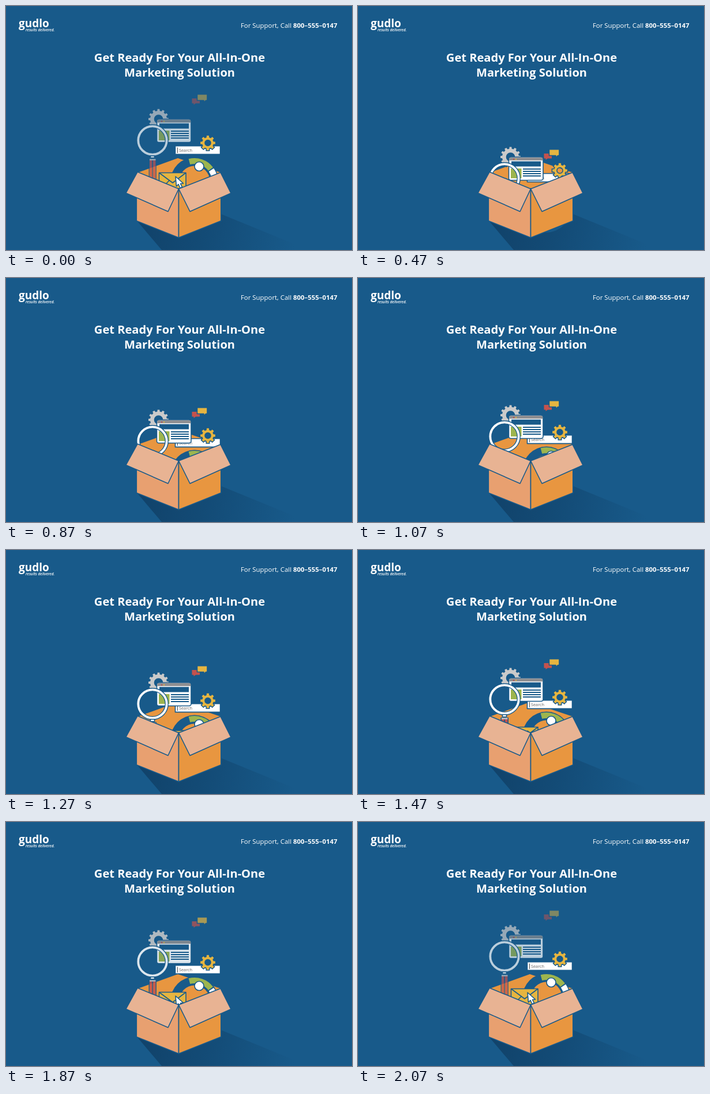
Animation, 600 px wide and 425 px high, one loop 3.07 s. Source, as an HTML page:

```html
<!DOCTYPE html>
<html lang="en">
<head>
<meta charset="utf-8">
<title>All-In-One Marketing Solution</title>
<style>
  html, body { margin: 0; width: 100%; height: 100%; overflow: hidden; background: #185a8a; }
  svg { display: block; width: 600px; height: 425px; --bg: #185a8a; font-family: "Open Sans", sans-serif; }
  .edge { stroke: var(--bg); stroke-width: 1.6; stroke-linejoin: round; }
  .gear { stroke: var(--bg); stroke-width: 3; paint-order: stroke; fill-rule: evenodd; }
  .line { stroke: var(--bg); fill: none; }
  .bg { fill: var(--bg); }
  .white { fill: #fff; }
  .yellow { fill: #e6b540; }
  .orange { fill: #e89640; }
  .green { stroke: #9db54e; }
  .red { fill: #c4524d; }
  .flap { fill: #e8b393; }
</style>
</head>
<body>
<svg viewBox="0 0 600 425">
  <defs>
    <linearGradient id="shade" gradientUnits="userSpaceOnUse" x1="240" y1="375" x2="500" y2="425">
      <stop offset="0" stop-color="#11436b"/>
      <stop offset=".4" stop-color="#134b76"/>
      <stop offset="1" stop-color="#185a8a"/>
    </linearGradient>
  </defs>
  <rect class="bg" width="600" height="425"/>

  <g class="white">
    <text x="22" y="36.5" font-size="19" font-weight="700">gudlo</text>
    <text x="34" y="44" font-size="6.5" font-weight="600" font-style="italic">results delivered.</text>
    <text x="574.5" y="38" font-size="11.4" text-anchor="end">For Support, Call <tspan font-weight="700">800–555–0147</tspan></text>
    <g font-size="20.1" font-weight="700" text-anchor="middle">
      <text x="301" y="97">Get Ready For Your All-In-One</text>
      <text x="301" y="123">Marketing Solution</text>
    </g>
  </g>

  <path fill="url(#shade)" d="M227 374L270 425H525L372 362Z"/>
  <path class="orange" d="M229 290L298 265L372 290L299 320Z"/>

  <!-- Items are drawn where they come to rest. -->
  <g id="bubbles">
    <path class="red" d="M322.5 161H336V169.5H329L325.5 172V169.5H322.5Z"/>
    <path class="yellow edge" d="M331.5 153.8H349V164.5H346.5L343 168V164.5H331.5Z"/>
  </g>

  <g id="tools">
    <rect class="white edge" x="293.5" y="243.8" width="78" height="14.6"/>
    <path stroke="#444" d="M297.5 246.5V256"/>
    <text x="300" y="254" font-size="7.3" fill="#666">Search</text>
    <path class="yellow gear" id="smallGear"/>
  </g>

  <g id="gauge">
    <circle class="bg" cx="327" cy="305" r="41.5"/>
    <circle class="orange" cx="327" cy="305" r="26.5"/>
    <g fill="none" stroke-width="10">
      <path class="green" id="greenArc"/>
      <path stroke="#fff" id="whiteArc"/>
    </g>
    <circle class="white edge" cx="335" cy="279.5" r="8"/>
    <g class="edge">
      <path class="yellow" d="M265.5 290.5H312V322H265.5Z"/>
      <path class="line" d="M265.5 290.5L289 308L312 290.5M265.5 322L283 304M312 322L295 304"/>
      <path class="white" d="M294 297L295.5 314L299 310.5L302 317L305.5 315.5L302.5 309.5L307.5 309Z"/>
    </g>
  </g>

  <g id="search">
    <path fill="#cacaca" class="gear" id="bigGear"/>
    <rect class="white edge" x="261.5" y="197" width="59.5" height="40.5" rx="3.5"/>
    <path fill="#8f8f92" d="M262.3 203V200.5Q262.3 197.8 265 197.8H317.5Q320.2 197.8 320.2 200.5V203Z"/>
    <path class="red" d="M269 200h2v2h-2z"/>
    <path class="yellow" d="M273 200h2v2h-2z"/>
    <rect class="bg" x="266" y="204.5" width="51" height="9"/>
    <rect fill="#9db54e" x="265" y="217" width="18.5" height="17"/>
    <path class="line" stroke-width="2" d="M286 218H317M286 222H317M286 226H317M286 230H317"/>
    <circle class="line" cx="254" cy="234" r="24.7" stroke-width="6.4"/>
    <circle fill="none" stroke="#fff" stroke-width="3.8" cx="254" cy="234" r="24.7"/>
    <rect class="white edge" x="250.5" y="260.8" width="7" height="4"/>
    <rect class="red edge" x="248.2" y="266.2" width="12" height="51"/>
    <path stroke="#cacaca" stroke-width="2.4" d="M249 267.6H259.5"/>
    <path class="line" stroke-width="1.6" d="M254.2 269V317"/>
  </g>

  <g class="edge">
    <path fill="#e8a070" d="M226.3 318H299.5V403.5L226.3 374.3Z"/>
    <path class="orange" d="M372.8 318H299.5V403.5L372.8 374.3Z"/>
    <path class="flap" d="M228 289L299.5 318.5L281 358L208 325.7Z"/>
    <path class="flap" d="M372 290L299.5 318.5L319 358L390 326Z"/>
  </g>
</svg>
<script>
  const $ = id => document.getElementById(id);
  const polar = (x, y, r, a) => `${(x + r * Math.cos(a)).toFixed(2)} ${(y + r * Math.sin(a)).toFixed(2)}`;

  function gear(x, y, teeth, outer, root, hole) {
    const step = 2 * Math.PI / teeth, points = [];
    for (let i = 0; i < teeth; i++) {
      const a = i * step - Math.PI / 2;
      for (const [r, d] of [[root, -.29], [outer, -.2], [outer, .2], [root, .29]])
        points.push(polar(x, y, r, a + d * step));
    }
    return `M${points.join("L")}ZM${x - hole} ${y}a${hole} ${hole} 0 1 0 ${2 * hole} 0a${hole} ${hole} 0 1 0 ${-2 * hole} 0Z`;
  }

  function arc(from, to) {
    const point = deg => polar(327, 305, 35, deg * Math.PI / 180);
    return `M${point(from)}A35 35 0 0 1 ${point(to)}`;
  }

  $("smallGear").setAttribute("d", gear(350, 238.5, 8, 13, 9.8, 5.8));
  $("bigGear").setAttribute("d", gear(264.5, 197, 12, 17.6, 14.5, 7.8));
  $("greenArc").setAttribute("d", arc(-105, -37));
  $("whiteArc").setAttribute("d", arc(-34, -8));

  const LOOP = 3070, START = 470, TICK = 100, LAST = 16;
  const after = (k, from) => Math.max(0, k - from);
  // Height risen and opacity at tick k.
  const items = [
    ["bubbles", k => 6 * k, k => 1 - .1 * after(k, 11)],
    ["tools", k => 3 * k, () => 1],
    ["gauge", k => 3 * k, () => 1],
    ["search", k => 4 * k + .5 * after(k, 12), k => 1 - .075 * after(k, 12)]
  ];

  function draw() {
    const t = performance.now() % LOOP;
    const k = t < START ? LAST : Math.min(LAST, Math.floor((t - START) / TICK));
    for (const [id, rise, alpha] of items) {
      $(id).setAttribute("transform", `translate(0 ${rise(LAST) - rise(k)})`);
      $(id).setAttribute("opacity", alpha(k));
    }
    requestAnimationFrame(draw);
  }
  draw();
</script>
</body>
</html>
```
